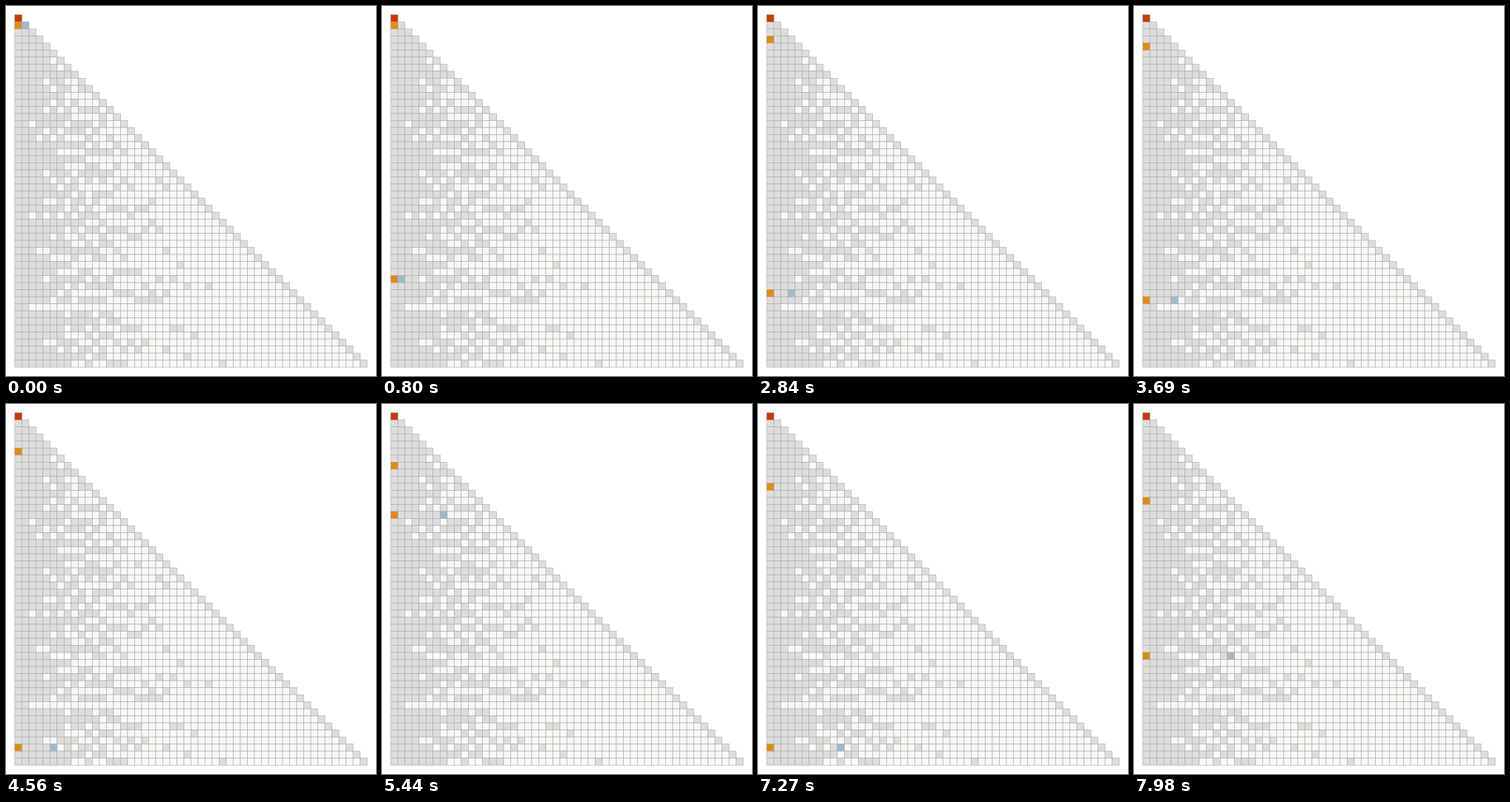
These frames come from a looping animation (499x499 px, 8 s). An HTML page with a canvas:

```html
<!DOCTYPE html>
<html lang="en">
<head>
<meta charset="utf-8">
<title>Triangular matrix sweep</title>
<style>
  html, body { margin: 0; width: 100%; height: 100%; overflow: hidden; background: #fff; }
  canvas { display: block; width: 499px; height: 499px; }
</style>
</head>
<body>
<canvas id="stage" width="499" height="499"></canvas>
<script>
const STAGE = 499, SIZE = 50, LOOP = 8000, STEPS = 360;
const PITCH = STAGE / 52.5, MARGIN = PITCH * 1.25;
const BLANK_ROW = 41;   // linked to the first two columns only
const COLORS = {
  filled: '#dedddb', empty: '#f8f8f6', line: '#abaaa8',
  pivot: '#c13d0c', factor: '#dd8c1c', target: '#a0bbc8'
};

function seededRandom(seed) {
  return () => {
    seed = (Math.imul(seed, 1664525) + 1013904223) >>> 0;
    return seed / 4294967296;
  };
}

// Share of filled cells: dense bands on the left, then a smooth decay
function density(col) {
  if (col < 2) return 1;
  if (col < 4) return 0.94;
  if (col < 7) return 0.76;
  if (col < 12) return 0.527;
  return 0.43 * Math.exp((12 - col) / 8);
}

// Random fill that carries its debt along, so the running count follows the density
function makeCells() {
  const random = seededRandom(7), cells = [];
  let debt = 0;
  for (let col = 0; col < SIZE; col++) {
    const share = density(col);
    for (let row = col; row < SIZE; row++) {
      debt += share;
      const chosen = row !== BLANK_ROW && debt > random() - 0.5;
      const filled = row === col || share === 1 || chosen;
      if (filled) debt--;
      cells.push({ row, col, filled });
    }
  }
  return cells;
}

function drawCell(g, row, col, color, lineAlpha = 1) {
  const x = MARGIN + col * PITCH, y = MARGIN + row * PITCH;
  g.fillStyle = color;
  g.fillRect(x, y, PITCH, PITCH);
  g.globalAlpha = lineAlpha;
  g.strokeStyle = COLORS.line;
  g.lineWidth = 0.6;
  g.strokeRect(x, y, PITCH, PITCH);
  g.globalAlpha = 1;
}

function makeGrid(cells) {
  const layer = document.createElement('canvas');
  layer.width = layer.height = STAGE;
  const g = layer.getContext('2d');
  g.fillStyle = '#fff';
  g.fillRect(0, 0, STAGE, STAGE);
  for (const { row, col, filled } of cells) {
    drawCell(g, row, col, filled ? COLORS.filled : COLORS.empty);
  }
  return layer;
}

const cells = makeCells();
const grid = makeGrid(cells);
// The sweep goes down each column and skips empty cells
const path = cells.filter(cell => cell.filled && cell.col > 0);
const ctx = document.getElementById('stage').getContext('2d');

function draw(time) {
  const step = Math.min(STEPS - 1, Math.floor((time + 5) * STEPS / LOOP));
  const { row, col } = path[step];
  const mark = (r, c, color) => drawCell(ctx, r, c, color, 0.5);
  ctx.drawImage(grid, 0, 0);
  mark(0, 0, COLORS.pivot);
  mark(col, 0, COLORS.factor);
  mark(row, 0, COLORS.factor);
  mark(row, col, COLORS.target);
}

const start = performance.now();
function tick() {
  draw((performance.now() - start) % LOOP);
  requestAnimationFrame(tick);
}
draw(0);
requestAnimationFrame(tick);
</script>
</body>
</html>
```
